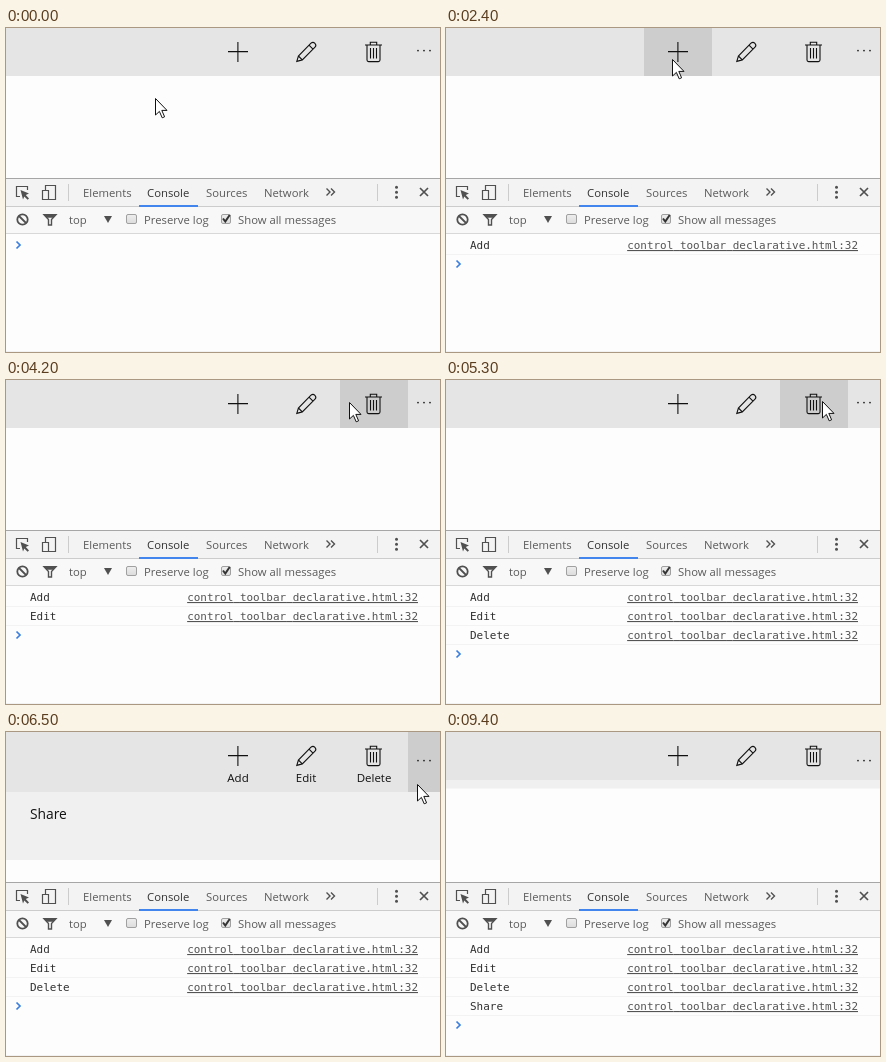
These frames come from a looping animation (434 px wide and 324 px high, 9.5 s). An HTML page:

```html
<!DOCTYPE html>
<html lang="en">
<head>
<meta charset="utf-8">
<title>Toolbar with console log</title>
<style>
  html, body { margin: 0; width: 100%; height: 100%; overflow: hidden; background: #fdfdfd; }
  svg { display: block; }
  text { font-family: "Open Sans", "Noto Sans", sans-serif; }
  .label { font-size: 11.5px; text-anchor: middle; fill: #111; }
  .ui { font-size: 11.3px; fill: #5a5a5a; }
  .mono text { font: 10.96px "DejaVu Sans Mono", monospace; fill: #303030; }
  .mono .link { fill: #545454; text-anchor: end; text-decoration: underline; text-decoration-skip-ink: none; }
  .line { fill: none; stroke: #111; stroke-width: 1.1; }
  .tool { fill: none; stroke: #505050; stroke-width: 1.2; }
  .solid { fill: #505050; }
</style>
</head>
<body>
<svg width="434" height="324" viewBox="0 0 434 324">
  <defs>
    <linearGradient id="box" x2="0" y2="1">
      <stop stop-color="#eeeeee"/><stop offset="1" stop-color="#dcdcdc"/>
    </linearGradient>
  </defs>
  <rect width="434" height="324" fill="#fdfdfd"/>

  <svg id="menu" width="434" height="48">
    <rect width="434" height="128" fill="#f0f0f0"/>
    <rect id="row" y="60" width="434" height="44" fill="#dadada"/>
    <text x="24" y="87" font-size="13.8" fill="#111">Share</text>
  </svg>

  <rect id="bar" width="434" height="48" fill="#e5e5e5"/>
  <rect id="hover"/>
  <g class="line">
    <path d="M231.9 14V34M222 23.6H242"/>
    <path d="M290.8 33.4L292.4 28L305 15.2Q307 13.4 308.9 15.3Q310.8 17.2 309 19.2L296.3 31.9ZM303 17.2L307 21.2M292.4 28L296.3 31.9"/>
    <path d="M359 17H376M364.3 17V14.2H370.7V17M361 17V32Q361 33.6 362.6 33.6H372.4Q374 33.6 374 32V17M364.5 20V30.5M367.5 20V30.5M370.5 20V30.5"/>
  </g>
  <g id="dots" fill="#222">
    <circle cx="412" r=".9"/><circle cx="418" r=".9"/><circle cx="424" r=".9"/>
  </g>
  <g id="labels">
    <text class="label" x="232" y="50">Add</text>
    <text class="label" x="300" y="50">Edit</text>
    <text class="label" x="368" y="50" font-size="11.3">Delete</text>
  </g>

  <!-- developer tools -->
  <rect y="151" width="434" height="27" fill="#f3f3f3"/>
  <rect y="179" width="434" height="26" fill="#f8f8f8"/>
  <rect y="150" width="434" height="1" fill="#a6a6a6"/>
  <rect y="178" width="434" height="1" fill="#cccccc"/>
  <rect y="205" width="434" height="1" fill="#d8d8d8"/>
  <rect x="133" y="177" width="59" height="2" fill="#4285ec"/>
  <path d="M62.5 156V173M371.5 156V173" stroke="#ccc"/>
  <g class="tool">
    <path d="M14 168.5H10.5V158.5H21.5V162"/>
    <path d="M39.5 162V157.5H49.5V171.5H43M36.5 162.5H42.5V171.5H36.5Z"/>
    <path d="M320.5 160.5L324 164L320.5 167.5M325 160.5L328.5 164L325 167.5" stroke-width="1.4"/>
    <path d="M414 160L422 168M422 160L414 168" stroke-width="1.7"/>
    <circle cx="16.5" cy="191.5" r="5.2" stroke-width="1.8"/>
    <path d="M13 188L20 195" stroke-width="1.8"/>
    <path d="M38 186.7H50L45.5 191.5V197H42.5V191.5Z" stroke-width="1.4"/>
  </g>
  <g class="solid">
    <path d="M14.5 162L23 165.5L19.8 167L23 170.4L21.6 171.8L18.3 168.5L17 171.5Z"/>
    <path d="M38 186.5H50L47.2 189.7H40.8Z"/>
    <path d="M98 188H106L102 195Z"/>
    <circle cx="390.5" cy="159.3" r="1.5"/><circle cx="390.5" cy="164.3" r="1.5"/><circle cx="390.5" cy="169.3" r="1.5"/>
  </g>
  <g fill="url(#box)" stroke="#a0a0a0">
    <rect x="120.5" y="186.5" width="10" height="9" rx="1.5"/>
    <rect x="215.5" y="186.5" width="9" height="9" rx="1.5"/>
  </g>
  <path d="M217 190.5L219.3 193.5L223.7 187" fill="none" stroke="#333" stroke-width="2"/>
  <g class="ui">
    <text x="77" y="169">Elements</text>
    <text x="141" y="169" fill="#333">Console</text>
    <text x="200" y="169">Sources</text>
    <text x="258" y="169">Network</text>
    <text x="63" y="196">top</text>
    <text x="138" y="196">Preserve log</text>
    <text x="232" y="196">Show all messages</text>
  </g>
  <g id="log" class="mono"></g>
  <path id="prompt" d="M10.5 213.5L14 217L10.5 220.5" fill="none" stroke="#3a7fe0" stroke-width="1.7"/>
  <rect y="323" width="434" height="1" fill="#f2f2f2"/>

  <path id="cursor" d="M.5 .5V17L4.4 13.4L7.2 19.8L9.6 18.8L6.8 12.4H12Z" fill="#fff" stroke="#111"/>
</svg>

<script>
const LOOP = 9500, STEP = 100, OPEN = 5800, CLOSE = 9200;
const $ = id => document.getElementById(id);
const set = (id, attrs) => {
  for (const name in attrs) $(id).setAttribute(name, attrs[name]);
};
const show = (id, on) => set(id, { visibility: on ? "visible" : "hidden" });
const easeOut = p => 1 - (1 - Math.min(1, Math.max(0, p))) ** 3;
const smooth = p => p * p * (3 - 2 * p);

// time, x, y of the pointer tip
const path = [
  [0, 149, 70], [600, 149, 70], [1200, 217, 32], [2200, 217, 32],
  [3100, 287, 25], [3900, 287, 25], [4400, 374, 21], [5250, 374, 21],
  [5600, 411, 27], [6200, 411, 27], [6500, 411, 52], [6700, 402, 73],
  [7300, 113, 77], [8700, 113, 77], [9200, -14, 90], [LOOP, -14, 90]
];
const presses = [[1500, 1700], [3300, 3400], [4600, 4800], [5800, 5900]];
const entries = [["Add", 1700], ["Edit", 3400], ["Delete", 4800], ["Share", 7700]];

// the underline stands in for the underscores
const link = "control_toolbar_declarative.html:32".replace(/_/g, '<tspan fill="none">_</tspan>');
$("log").innerHTML = entries.map(([name], i) => {
  const y = 221 + i * 19;
  return `<g><rect y="${y + 5}" width="434" height="1" fill="#f3f3f3"/>
    <text x="24" y="${y}">${name}</text>
    <text class="link" x="412" y="${y}">${link}</text></g>`;
}).join("");

function pointer(t) {
  const i = path.findIndex(key => key[0] > t);
  const [t0, x0, y0] = path[i - 1], [t1, x1, y1] = path[i];
  const p = smooth((t - t0) / (t1 - t0));
  return [x0 + (x1 - x0) * p, y0 + (y1 - y0) * p];
}

function draw(t) {
  const [x, y] = pointer(t);
  const expanded = t > OPEN && t < CLOSE + STEP;
  const barHeight = expanded ? 60 : 48;
  const openness = easeOut((t - OPEN) / 400) - easeOut((t - CLOSE) / 380);
  set("cursor", { transform: `translate(${Math.round(x)} ${Math.round(y)})` });
  set("menu", { height: 48 + 80 * openness });
  set("bar", { height: barHeight });
  set("dots", { transform: `translate(0 ${t > OPEN ? 28.6 : 22.6})` });
  show("labels", expanded);
  show("row", expanded && x >= 0 && y >= 60 && y < 104);

  const left = x < 402 ? 198 + 68 * Math.floor((x - 198) / 68) : 402;
  const pressed = presses.some(([from, to]) => t >= from && t < to);
  set("hover", {
    x: left, width: x < 402 ? 68 : 32, height: barHeight,
    fill: pressed ? "#b3b3b3" : "#cdcdcd"
  });
  show("hover", x >= 198 && y < barHeight);

  const count = entries.filter(entry => t >= entry[1]).length;
  [...$("log").children].forEach((row, i) => row.style.display = i < count ? "" : "none");
  set("prompt", { transform: `translate(0 ${count * 19})` });
}

function frame() {
  draw(Math.floor(performance.now() % LOOP / STEP) * STEP);
  requestAnimationFrame(frame);
}
frame();
</script>
</body>
</html>
```
